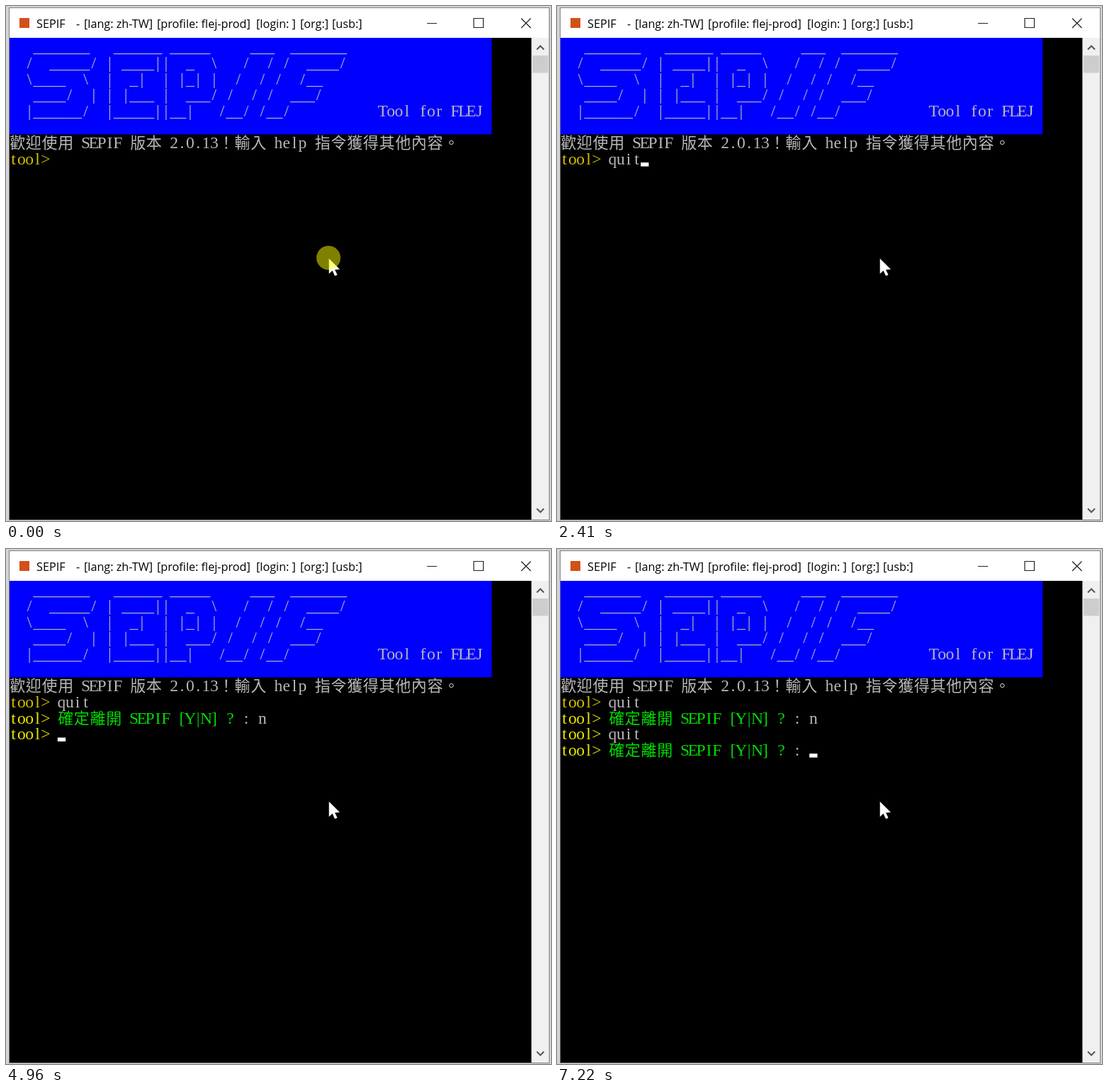
Write an HTML page with a canvas that moves like this. It is 769x728 px and loops after 8 s.

```html
<!DOCTYPE html>
<html lang="zh-Hant">
<head>
<meta charset="utf-8">
<title>Terminal</title>
<style>
  html, body { margin: 0; width: 100%; height: 100%; overflow: hidden; background: #d4d4d4; }
  canvas { display: block; }
</style>
</head>
<body>
<canvas id="stage" width="769" height="728"></canvas>
<script>
const ctx = document.getElementById('stage').getContext('2d');

const LOOP = 8000;
const LEFT = 4.8, TOP = 45.4;
const CELL = 34 / 3, ROW = 68 / 3, BASE = 19.8;
const GREY = '#b8b8b8', GREEN = '#00dc00', YELLOW = '#ece600', GOLD = '#d0c000';

const LATIN = '23.5px "Liberation Serif", serif';
const HAN = '300 22px "Noto Sans CJK TC", "Noto Sans CJK", sans-serif';
const TITLE = '16.2px "Open Sans", sans-serif';

const BANNER = [
  String.raw`   _______   ______ _____     ___  _______`,
  String.raw`  /  _____/ | ____||  _  \   /  / /  ____/`,
  String.raw`  \____  \  |  _|  | |_| |  /  / /  /__`,
  String.raw`   ____/  | | |___ |  ___/ /  / /  ___/`,
  String.raw`  |______/  |_____||__|   /__/ /__/`
];

// [time, typed command, answer, lines shown, cursor visible]
const STEPS = [
  [0, '', '', 1, 0],
  [380, '', '', 1, 1],
  [920, '', '', 1, 0],
  [1470, '', '', 1, 1],
  [1940, 'q', '', 1, 0],
  [2160, 'qu', '', 1, 1],
  [2310, 'qui', '', 1, 1],
  [2400, 'quit', '', 1, 1],
  [2480, 'quit', '', 1, 0],
  [2710, 'quit', '', 2, 1],
  [3570, 'quit', '', 2, 0],
  [3870, 'quit', 'n', 2, 1],
  [4100, 'quit', 'n', 2, 0],
  [4580, 'quit', 'n', 2, 1],
  [4960, '', '', 3, 1],
  [5570, 'q', '', 3, 1],
  [5660, 'q', '', 3, 0],
  [6110, 'qu', '', 3, 1],
  [6200, 'qu', '', 3, 0],
  [6260, 'qui', '', 3, 1],
  [6430, 'quit', '', 3, 1],
  [6760, 'quit', '', 3, 0],
  [7220, 'quit', '', 4, 1]
];

function rect(color, x, y, w, h) {
  ctx.fillStyle = color;
  ctx.fillRect(x, y, w, h);
}

function path(points, close) {
  ctx.beginPath();
  points.forEach(([x, y]) => ctx.lineTo(x, y));
  if (close) ctx.closePath();
}

function stroke(points, color, width, close) {
  path(points, close);
  ctx.strokeStyle = color;
  ctx.lineWidth = width;
  ctx.stroke();
}

// Writes on the character grid and returns the next free column.
function write(text, col, row, color) {
  ctx.fillStyle = color;
  ctx.textAlign = 'center';
  for (const ch of text) {
    const wide = ch.codePointAt(0) > 0x2e80;
    const span = wide ? 2 : 1;
    if (ch !== ' ') {
      ctx.font = wide ? HAN : LATIN;
      ctx.fillText(ch, LEFT + (col + span / 2) * CELL, TOP + row * ROW + BASE);
    }
    col += span;
  }
  return col;
}

function drawWindow() {
  rect('#d4d4d4', 0, 0, 769, 728);
  rect('#808080', 4, 2, 763, 725);
  rect('#ffffff', 5, 3, 761, 42);
  rect('#000000', 5, 45, 736.5, 681);
  rect('#d2501a', 19, 17, 14, 14);

  ctx.font = TITLE;
  ctx.textAlign = 'left';
  ctx.fillStyle = '#000000';
  const parts = [
    ['SEPIF', 43], ['-', 99], ['[lang: zh-TW]', 110], ['[profile: flej-prod]', 213],
    ['[login: ]', 353], ['[org:]', 415], ['[usb:]', 460]
  ];
  parts.forEach(([text, x]) => ctx.fillText(text, x, 31));

  rect('#222222', 594, 24, 14, 1);
  stroke([[660, 17.5], [673.5, 17.5], [673.5, 30.5], [660, 30.5]], '#222222', 1.2, true);
  stroke([[727, 17.5], [740.5, 31]], '#222222', 1.2);
  stroke([[740.5, 17.5], [727, 31]], '#222222', 1.2);

  rect('#f0f0f0', 741.5, 45, 24.5, 681);
  rect('#cdcdcd', 743, 70, 22, 24.5);
  stroke([[749, 61.5], [754, 56.5], [759, 61.5]], '#555555', 2);
  stroke([[749, 710.5], [754, 715.5], [759, 710.5]], '#555555', 2);
}

function drawBanner() {
  rect('#0000ff', 5, 45, 680.4, 136.5);
  BANNER.forEach((line, row) => write(line, 0, row, GREY));
  write('Tool for FLEJ', 46, 4, GREY);
  write('歡迎使用 SEPIF 版本 2.0.13！輸入 help 指令獲得其他內容。', 0, 6, GREY);
}

function drawSession(t) {
  const [, typed, answer, count, cursor] = STEPS.findLast(step => step[0] <= t);
  let col = 0;
  for (let i = 0; i < count; i++) {
    const row = 7 + i;
    const last = i === count - 1;
    col = write('tool> ', 0, row, i ? YELLOW : GOLD);
    if (i % 2) {
      col = write('確定離開 SEPIF [Y|N] ? ', col, row, GREEN);
      col = write(': ' + (last ? answer : 'n'), col, row, GREY);
    } else {
      col = write(last ? typed : 'quit', col, row, GREY);
    }
  }
  if (cursor) {
    const bottom = TOP + (7 + count) * ROW;
    rect('#ffffff', LEFT + col * CELL, bottom - 5.5, CELL, 5.5);
  }
}

function drawPointer(t) {
  path([[455.7, 357], [455.7, 378.5], [460.5, 374], [464, 381.5], [467.5, 380], [464, 372.7], [471, 372.2]], true);
  ctx.fillStyle = '#ffffff';
  ctx.fill();
  if (t < 80) {
    ctx.beginPath();
    ctx.arc(455, 356, 17, 0, Math.PI * 2);
    ctx.fillStyle = 'rgba(255, 255, 0, 0.5)';
    ctx.fill();
  }
}

const start = performance.now();

function frame() {
  const t = (performance.now() - start) % LOOP;
  drawWindow();
  drawBanner();
  drawSession(t);
  drawPointer(t);
  requestAnimationFrame(frame);
}
frame();
</script>
</body>
</html>
```
